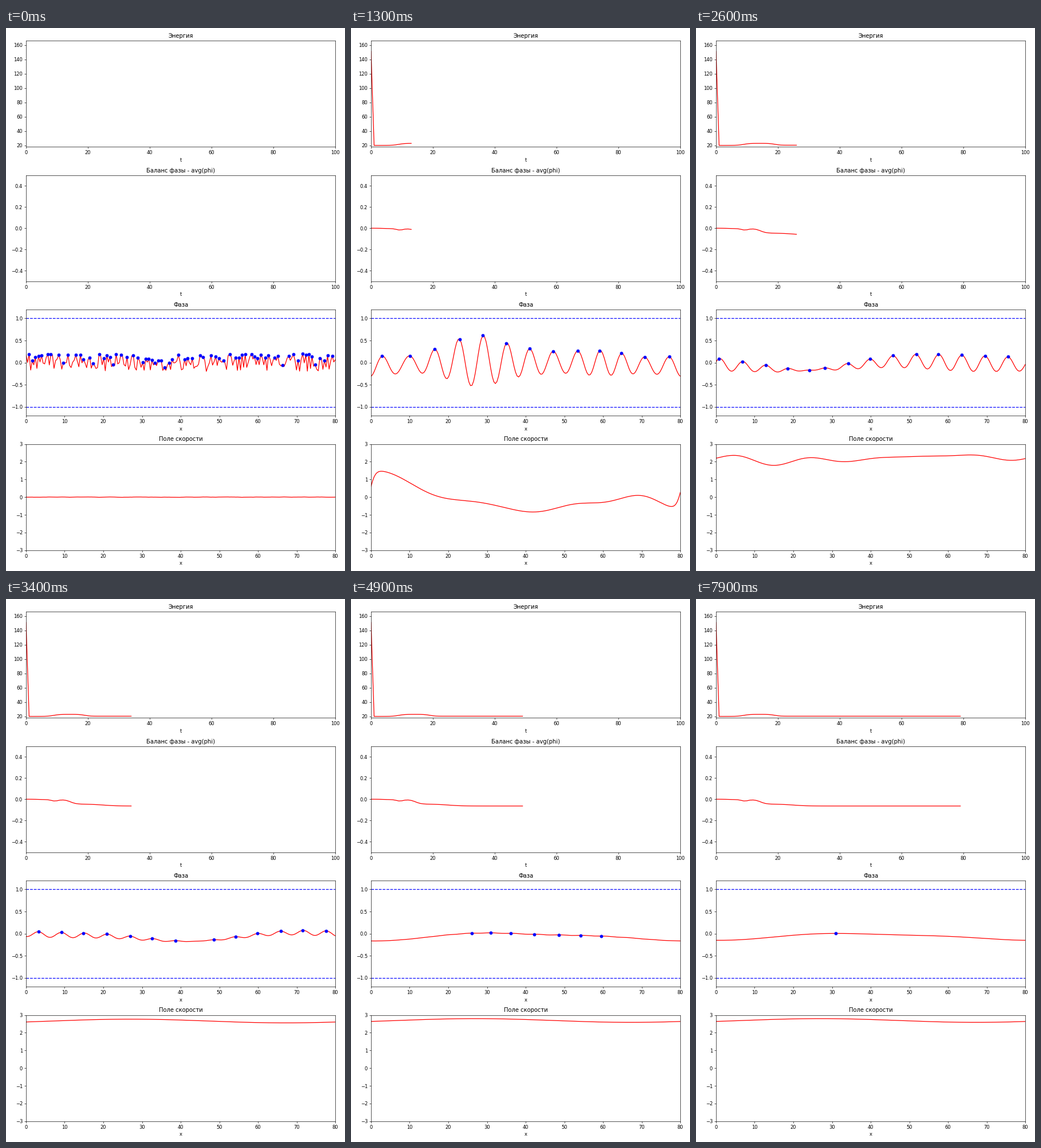
Write a matplotlib script that moves like this. It is 592 by 947 pixels and loops after 8000 ms.

```python
import numpy as np
import matplotlib.pyplot as plt
from matplotlib.animation import FuncAnimation

W, H, DPI = 592, 947, 60
FRAMES, STEP = 80, 100
N = 200
x = np.linspace(0, 80, N)
L = 80 + x[1]  # spatial period of the grid
T = np.arange(FRAMES)


def mode(n, q):
    return np.cos(2 * np.pi * n * q / L)


def sigmoid(u):
    return 1 / (1 + np.exp(-u))


def smoothstep(s):
    s = np.clip(s, 0, 1)
    return s * s * (3 - 2 * s)


# Histories
ENERGY = 20 + 131.2 * (T == 0) + .35 * np.tanh(T / 10) + 2.6 * np.exp(-((T - 14) / 5.5) ** 4)
BALANCE = -(.004 * sigmoid(T - 4) + .013 * np.exp(-((T - 9.3) / 1.5) ** 2)
            + .042 * sigmoid((T - 14.4) / .9) + .018 * sigmoid((T - 25) / 2.2))


def drift(t):
    """Distance the pattern has been carried: the flow starts and settles."""
    s = max(t - 11, 0)
    return 2.69 * (s - 7 * (1 - np.exp(-s / 7)))


def amplitude(t):
    """Exponential growth that gives way to decay."""
    grow = .25 * np.exp(.25 * (t - 7))
    u = t - 34
    fade = .06 * np.exp(-.15 * u - .0015 * u * u)
    return 1 / np.hypot(1 / grow, 1 / fade)


def phase(t):
    if t == 0:
        return np.random.default_rng(4).uniform(-.2, .2, N)
    q = x - drift(t)
    late = smoothstep((t - 7) / 11)
    early_ripple = ((.78 + .29 * mode(3, q - 28) + .2 * mode(1, q - 36))
                    * mode(13, q - 3.5 - 1.3 * mode(1, q - 43)))
    late_ripple = mode(.5, q - 40.7) * mode(13.5, q - 33.9)  # beat of 13 and 14 waves
    ripple = early_ripple + (late_ripple - early_ripple) * late
    swell = (.085 * np.exp((34 - t) / 250) * mode(1, q + 5.7)
             + .03 * np.exp((34 - t) / 100) * mode(2, q - .3))
    return BALANCE[t] + amplitude(t) * ripple - late * swell


# Flow profiles, blended in time
edge = (x + .2 + L / 2) % L - L / 2
START = (.6 * mode(1, x - 4) - .07 - .12 * mode(4, x - 22)
         + np.tanh(edge / 1.3) * np.exp(-(edge / 9) ** 2))
RISE = 1.7 - .4 * mode(1, x - 22) + (.25 + .25 * mode(1, x - 12)) * mode(4, x - 4.8)
STEADY = 2.69 + .105 * mode(1, x - 27)
FLOWS = [(7, START), (11, 1.5 * START - .7), (18, RISE), (34, STEADY - .03), (49, STEADY),
         (79, STEADY)]


def velocity(t):
    if t == 0:
        raw = np.random.default_rng(2).uniform(-.02, .02, N)
        return np.convolve(raw, np.ones(5) / 5, "same")
    if t <= 7:
        return START * np.exp(.4 * (t - 7))
    for (t0, a), (t1, b) in zip(FLOWS, FLOWS[1:]):
        if t <= t1:
            return a + (b - a) * (t - t0) / (t1 - t0)


plt.rcParams.update({"figure.dpi": DPI, "savefig.dpi": DPI, "font.family": "DejaVu Sans"})
fig, axes = plt.subplots(4, 1, figsize=(W / DPI, H / DPI), dpi=DPI)


def panel(ax, title, label, xmax, ylim):
    ax.set(title=title, xlabel=label, xlim=(0, xmax), ylim=ylim)
    return ax.plot([], [], "r")[0]


energy = panel(axes[0], "Энергия", "t", 100, (18, 166.3))
balance = panel(axes[1], "Баланс фазы - avg(phi)", "t", 100, (-.5, .5))
wave = panel(axes[2], "Фаза", "x", 80, (-1.2, 1.2))
flow = panel(axes[3], "Поле скорости", "x", 80, (-3, 3))
for level in (-1, 1):
    axes[2].plot([0, 80], [level, level], "b--")
peaks, = axes[2].plot([], [], "bo")
fig.tight_layout()


def update(t):
    energy.set_data(T[:t + 1], ENERGY[:t + 1])
    balance.set_data(T[:t + 1], BALANCE[:t + 1])
    y = phase(t)
    wave.set_data(x, y)
    top = 1 + np.flatnonzero((y[1:-1] > y[:-2]) & (y[1:-1] > y[2:]))
    peaks.set_data(x[top], y[top])
    flow.set_data(x, velocity(t))
    return energy, balance, wave, peaks, flow


anim = FuncAnimation(fig, update, frames=FRAMES, interval=STEP, repeat=True, repeat_delay=0)
plt.show()
```
